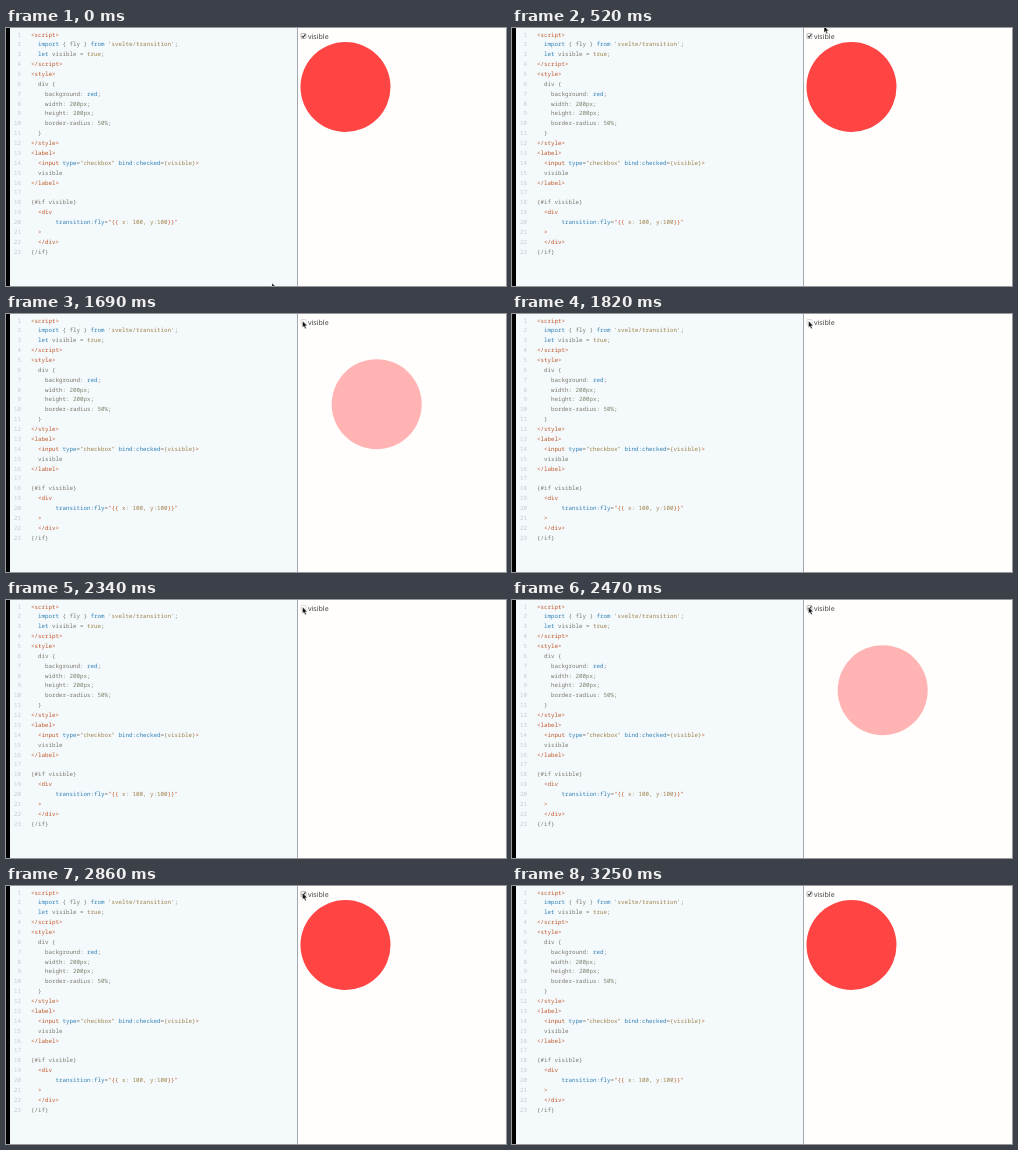
An HTML page that plays this animation: 500x258 px, repeating every 3770 ms.

```html
<!DOCTYPE html>
<html lang="en">
<head>
<meta charset="utf-8">
<title>Fly transition</title>
<style>
  html, body { margin: 0; width: 100%; height: 100%; overflow: hidden; background: #fffefd; }
  svg { display: block; width: 500px; height: 258px; }
  text { white-space: pre; text-rendering: geometricPrecision; }
  #code text { font: 5.83px "Noto Sans Mono", "DejaVu Sans Mono", monospace; }
  #code .num { fill: #c3cad1; text-anchor: end; }
  .b { fill: hsl(45, 7%, 45%); }
  .k { fill: hsl(204, 58%, 45%); }
  .t { fill: hsl(19, 67%, 45%); }
  .s { fill: hsl(41, 37%, 45%); }
  .n { fill: hsl(80, 10%, 47%); }
  .label { font: 7px "Noto Sans", "Open Sans", sans-serif; fill: #444; }
</style>
</head>
<body>
<svg viewBox="0 0 500 258">
  <rect width="500" height="258" fill="#fffefd"/>
  <rect width="292" height="258" fill="#f4f9fc"/>
  <rect width="4" height="258" fill="#000"/>
  <rect x="291" width="1" height="258" fill="#a3a8b0"/>
  <g id="code"></g>
  <circle id="ball" cx="339.5" cy="59" r="45" fill="#ff4444"/>
  <rect id="box" x="295" y="5.5" width="5" height="5" rx=".7" fill="#fff" stroke="#999" stroke-width=".7"/>
  <path id="check" d="M296 8l1.2 1.4 2.2-3.2" fill="none" stroke="#333" stroke-width="1.1"/>
  <text class="label" x="302" y="11">visible</text>
  <path id="cursor" d="M0 0v6.6l1.5-1.4 1.1 2.5 1.2-.5-1.1-2.4h2.1z" fill="#111" stroke="#fff" stroke-width=".4"/>
</svg>
<script>
const LOOP = 3770, STEP = 130, FLY = 435;
const OUT = 1305, IN = 2420, HIDE = 3250;
const $ = id => document.getElementById(id);

// Pieces are split by "|"; the first letter of each is its colour class.
const rows = [
  't<script\>',
  'k  import|b { fly } |kfrom|s \'svelte/transition\'|b;',
  'k  let|b visible = |strue|b;',
  't<\/script>',
  't<style>',
  'b  div {',
  'b    background: |kred|b;',
  'b    width: |n200px|b;',
  'b    height: |n200px|b;',
  'b    border-radius: |n50%|b;',
  'b  }',
  't<\/style>',
  't<label>',
  't  <input |ktype|b=|s"checkbox" |kbind:checked|b=|s{visible}|t>',
  'b  visible',
  't<\/label>',
  '',
  'b{#if visible}',
  't  <div',
  'k       transition:fly|b=|t"{{|s x: 100, y:100|t}}"',
  't  >',
  't  <\/div>',
  'b{/if}'
];

const clean = s => s.replace(/</g, '&lt;').replace(/>/g, '&gt;');
const piece = p => `<tspan class="${p[0]}">${clean(p.slice(1))}</tspan>`;
$('code').innerHTML = rows.map((row, i) => {
  const y = (8.6 + i * 9.86).toFixed(2);
  const text = row ? row.split('|').map(piece).join('') : '';
  return `<text class="num" x="15" y="${y}">${i + 1}</text><text x="25" y="${y}">${text}</text>`;
}).join('');

// Pointer positions: time, x, y
const path = [
  [0, 266, 255], [130, 279, 190], [260, 296, 96], [390, 307, 26],
  [520, 312, -2], [650, 300, 4], [780, 296.5, 7]
];

const clamp = v => Math.min(1, Math.max(0, v));

// Distance flown: 0 at rest, 1 fully away
function away(t) {
  return t < IN ? clamp((t - OUT) / FLY) ** 3 : (1 - clamp((t - IN) / FLY)) ** 3;
}

function show(id, on) {
  $(id).setAttribute('visibility', on ? 'visible' : 'hidden');
}

function draw(t) {
  const u = away(t);
  $('ball').setAttribute('transform', `translate(${45 * u} ${45 * u})`);
  $('ball').setAttribute('opacity', 1 - u ** 1.4);

  const checked = t < OUT || t >= IN;
  show('check', checked);
  $('box').setAttribute('stroke', checked ? '#999' : '#ccc');

  const [, x, y] = path.filter(p => p[0] <= t).pop();
  $('cursor').setAttribute('transform', `translate(${x} ${y})`);
  show('cursor', t < HIDE);
}

const start = performance.now();
function frame() {
  // Half a display frame of lead keeps each step from showing late
  const t = (performance.now() - start + 8) % LOOP;
  draw(Math.floor(t / STEP) * STEP);
  requestAnimationFrame(frame);
}
frame();
</script>
</body>
</html>
```
